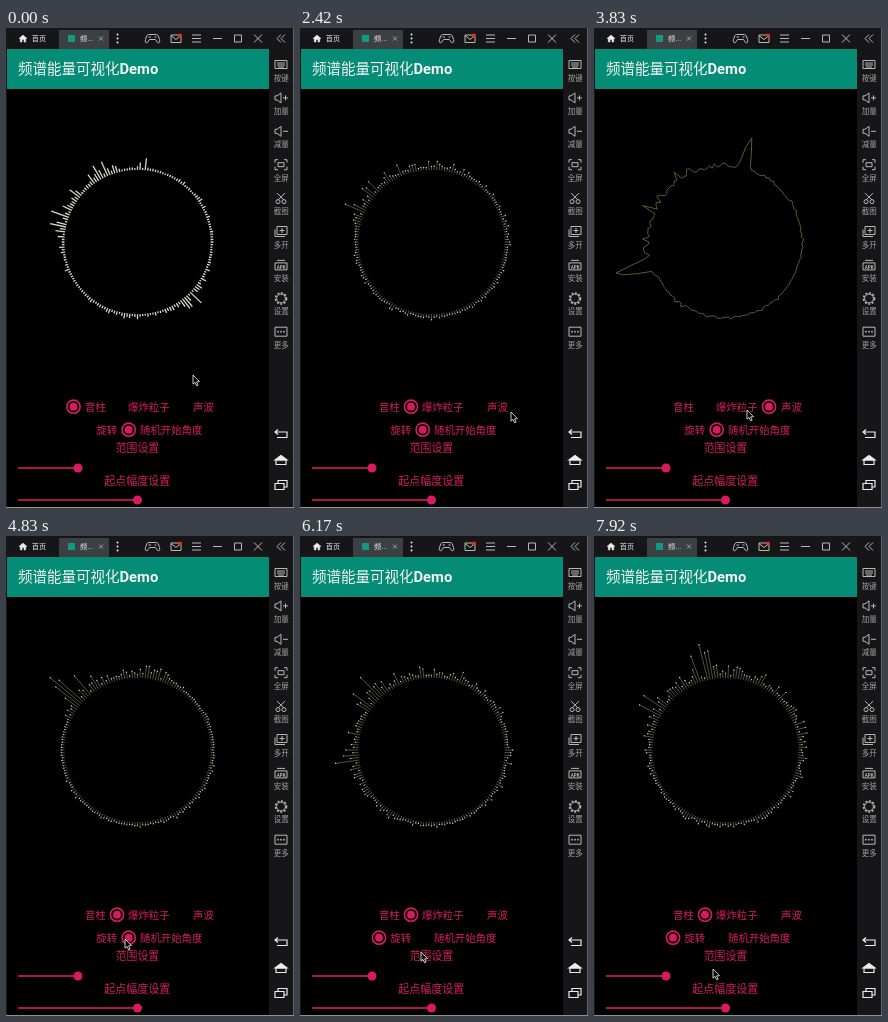
Recreate the animation shown at these times as an HTML page with a canvas. Size 288 by 480 pixels, loop 8000 ms.

```html
<!DOCTYPE html>
<html lang="zh">
<head>
<meta charset="utf-8">
<style>
html, body { margin: 0; width: 100%; height: 100%; overflow: hidden; background: #000; }
canvas { display: block; width: 288px; height: 480px; }
</style>
</head>
<body>
<canvas id="stage"></canvas>
<script>
const W = 288, H = 480, LOOP = 8000, FPS = 12, TAU = Math.PI * 2;
const canvas = document.getElementById('stage');
const ctx = canvas.getContext('2d');
const dpr = window.devicePixelRatio || 1;
canvas.width = W * dpr;
canvas.height = H * dpr;

const CJK = '"Noto Sans CJK SC", "Noto Sans CJK", sans-serif';
const CHROME = '#161618', GREY = '#b8b8b4', LIGHT = '#ecece8';
const TEAL = '#048c76', PINK = '#d81b60';
const CX = 131.5, CY = 214, R = 73.6, SQUASH = .987, BARS = 180;
const COLUMNS = 0, PARTICLES = 1, WAVE = 2;

const STYLES = [
  { stroke: '#d8d8c8', width: 1.3, base: 1.3 },
  { stroke: '#52523c', width: 1, base: 1.8 },
  { stroke: '#64643c', width: .9, base: 2 }
];

// Each phase runs until a tick; a lobe is [angle, spread, height].
const PHASES = [
  { until: 18, mode: COLUMNS, lobes: [[-2.72, .25, 24], [-2.05, .15, 21], [-1.5, .1, 8]], roam: true },
  { until: 31, mode: PARTICLES, lobes: [[-2.62, .25, 27], [-2.05, .1, 22], [-1.5, .3, 5]] },
  { until: 48, mode: WAVE, lobes: [[-1.33, .05, 32], [2.85, .06, 36], [-2.5, .6, 14]] },
  { until: 63, mode: PARTICLES, lobes: [[-2.4, .17, 38], [-2.05, .15, 16], [-1.5, .4, 8]] },
  { until: 96, mode: PARTICLES, lobes: [[-1.8, .17, 24], [-2.6, .1, 20], [-1.5, 1.8, 9]], spin: true }
];

// Pointer stops: tick, x, y
const POINTER = [
  [0, 187, 347], [16, 146, 376], [29, 211, 384], [46, 153, 382],
  [58, 119, 403], [62, 100, 402], [74, 121, 416], [95, 119, 433]
];

function hash(a, b) {
  const s = Math.sin(a * 127.1 + b * 311.7 + 17.3) * 43758.5453;
  return s - Math.floor(s);
}

function text(str, x, y, size, color, weight = 400, family = CJK) {
  ctx.font = `${weight} ${size}px ${family}`;
  ctx.fillStyle = color;
  ctx.fillText(str, x, y);
}

function rect(x, y, w, h, color) {
  ctx.fillStyle = color;
  ctx.fillRect(x, y, w, h);
}

function dot(x, y, r, color) {
  ctx.fillStyle = color;
  ctx.beginPath();
  ctx.arc(x, y, r, 0, TAU);
  ctx.fill();
}

function circle(x, y, r, color, width) {
  ctx.strokeStyle = color;
  ctx.lineWidth = width;
  ctx.beginPath();
  ctx.arc(x, y, r, 0, TAU);
  ctx.stroke();
}

// Draws an SVG path around a centre point, optionally filled.
function icon(x, y, d, { color = GREY, width = 1, fill } = {}) {
  const path = new Path2D(d);
  ctx.save();
  ctx.translate(x, y);
  if (fill) {
    ctx.fillStyle = fill;
    ctx.fill(path);
  }
  ctx.strokeStyle = color;
  ctx.lineWidth = width;
  ctx.stroke(path);
  ctx.restore();
}

function topBar() {
  rect(0, 0, W, 21, CHROME);
  rect(53, 2, 50, 19, '#3c4042');
  icon(17, 10.5, 'M-4 0L0-3.5L4 0H2.7V3.5H1V1H-1V3.5H-2.7V0Z', { color: LIGHT, width: .5, fill: LIGHT });
  text('首页', 25.7, 13.2, 7.2, LIGHT, 500);
  rect(62, 7, 7, 7, '#129a80');
  text('频...', 74, 13.2, 7.2, LIGHT, 500);
  icon(95, 10.5, 'M-2-2L2 2M2-2L-2 2', { width: .8 });
  for (const y of [6.5, 10.5, 14.5]) dot(111.5, y, 1, LIGHT);
  icon(146.5, 10.5, 'M-4-4H4Q6-4 7 1Q8 5 5 4L3 1H-3L-5 4Q-8 5-7 1Q-6-4-4-4ZM-4-1.5H-1.5M2-1.5H4');
  icon(170, 10.5, 'M-5-3.5H5V4H-5ZM-5-3L0 1L5-3');
  dot(174, 7.5, 2, '#e83018');
  icon(190.5, 10.5, 'M-4.5-3.5H4.5M-4.5 0H4.5M-4.5 3.5H4.5');
  icon(211.5, 10.5, 'M-4.5 0H4.5');
  icon(232, 10.5, 'M-3.5-3.5H3.5V3.5H-3.5Z');
  icon(252, 10.5, 'M-4-4L4 4M4-4L-4 4');
  icon(275, 10.5, 'M0-4L-4 0L0 4M4-4L0 0L4 4');
}

const SPEAKER = 'M-6-2H-4L0-5V5L-4 2H-6Z';
const TOOLS = [
  ['按键', 'M-6-4H6V4H-6ZM-4-1.5H4M-4 .5H4M-3 2.5H3'],
  ['加量', SPEAKER + 'M2 0H7M4.5-2.5V2.5'],
  ['减量', SPEAKER + 'M2 0H7'],
  ['全屏', 'M-6-2V-5H-3M3-5H6V-2M6 2V5H3M-3 5H-6V2M-3-2H3V2H-3Z'],
  ['截图', 'M-4-5L3 2M4-5L-3 2M-5 3.5A2 2 0 1 0-1 3.5A2 2 0 1 0-5 3.5M1 3.5A2 2 0 1 0 5 3.5A2 2 0 1 0 1 3.5'],
  ['多开', 'M-6-2V5H4M-4-5H6V3H-4ZM1-3.5V1.5M-1.5-1H3.5'],
  ['安装', 'M-6-2V5H6V-2ZM-4-4.5H4'],
  ['设置', ''],
  ['更多', 'M-6-4.5H6V4.5H-6Z']
];

function sideBar() {
  rect(263, 21, 25, H - 21, CHROME);
  rect(0, 21, 1, H - 21, CHROME);
  TOOLS.forEach(([label, d], i) => {
    const y = 36.5 + i * 33.4;
    icon(275, y, d);
    text(label, 267.7, y + 16, 7.5, '#a4a4a0');
  });
  text('APK', 270.7, 240.5, 4.6, GREY, 700, 'Roboto, sans-serif');
  ctx.setLineDash([2, 1.6]);
  circle(275, 270.5, 5.5, GREY, 1.6);
  ctx.setLineDash([]);
  circle(275, 270.5, 4.4, GREY, 1);
  for (const x of [272, 275, 278]) dot(x, 303.7, .9, GREY);

  const nav = { color: LIGHT, width: 1.2 };
  icon(275, 405.5, 'M-3-4L-6-1.5L-3 1M-6-1.5H6V4H-4', nav);
  icon(275, 432, 'M-5 0H5V4.5H-5Z', nav);
  icon(275, 432, 'M-6 0L0-4.5L6 0Z', { ...nav, fill: LIGHT });
  icon(275, 457, 'M-6-1.5H3V4.5H-6ZM-3-1.5V-4.5H6V2H3', nav);

  rect(287, 0, 1, H, '#5c6468');
  rect(0, 479, W, 1, '#8a9498');
}

function radio(x, y) {
  circle(x, y, 6.6, PINK, 1.6);
  dot(x, y, 3.9, PINK);
}

function slider(y, end) {
  rect(12, y - .8, end - 12, 1.6, PINK);
  dot(end, y, 4.5, PINK);
}

function controls(mode, spin) {
  radio([67.5, 111, 175][mode], 378.7);
  text('音柱', 79, 382.7, 10.4, PINK);
  text('爆炸粒子', 122, 382.7, 10.4, PINK);
  text('声波', 187, 382.7, 10.4, PINK);
  radio(spin ? 79 : 122.7, 401.7);
  text('旋转', 90.3, 405.5, 10.4, PINK);
  text('随机开始角度', 134, 405.5, 10.4, PINK);
  text('范围设置', 109.7, 424.3, 10.9, PINK);
  text('起点幅度设置', 98.3, 456.5, 11, PINK);
  slider(440, 72);
  slider(472, 131.5);
}

// Random heights under bell-shaped lobes; some lobes roam or spin.
function spectrum(tick, { mode, lobes, roam, spin }) {
  const all = roam ? [...lobes, [.75 + tick * .085, .22, 15 - tick * .4]] : lobes;
  const turn = spin ? (tick - 95) * .03 : 0;
  return Array.from({ length: BARS }, (_, i) => {
    const angle = i / BARS * TAU;
    const noise = hash(i, tick);
    let level = STYLES[mode].base + hash(i, tick + 50) + 3 * noise ** 4;
    for (const [centre, spread, height] of all) {
      const d = angle - centre - turn;
      const away = Math.atan2(Math.sin(d), Math.cos(d)) / spread;
      const rough = mode === WAVE && spread < .1 ? 1 : noise ** 1.7;
      level += height * Math.exp(-away * away) * rough;
    }
    return level;
  });
}

function polar(i, r) {
  const a = i / BARS * TAU;
  return [CX + r * Math.cos(a), CY + r * Math.sin(a) * SQUASH];
}

function ring(levels, mode) {
  const { stroke, width } = STYLES[mode];
  ctx.beginPath();
  levels.forEach((level, i) => {
    if (mode !== WAVE) ctx.moveTo(...polar(i, R - .5));
    ctx.lineTo(...polar(i, R + level));
  });
  if (mode === WAVE) ctx.closePath();
  ctx.strokeStyle = stroke;
  ctx.lineWidth = width;
  ctx.stroke();
  if (mode === PARTICLES) {
    levels.forEach((level, i) => dot(...polar(i, R + level), .7, '#ccccb4'));
  }
}

function pointer(tick) {
  const n = Math.max(1, POINTER.findIndex(p => p[0] >= tick));
  const [from, x0, y0] = POINTER[n - 1];
  const [to, x1, y1] = POINTER[n];
  const u = (tick - from) / (to - from);
  const ease = u * u * (3 - 2 * u);
  icon(x0 + (x1 - x0) * ease, y0 + (y1 - y0) * ease,
    'M0 0V9.2L2 7.4L3.6 10.8L5.1 10.1L3.6 6.9L6.5 6.7Z',
    { color: '#e0e0d8', width: .9, fill: '#000' });
}

function draw(ms) {
  const tick = Math.min(95, Math.floor((ms % LOOP + 8) * FPS / 1000));
  const phase = PHASES.find(p => tick < p.until);
  ctx.setTransform(dpr, 0, 0, dpr, 0, 0);
  rect(0, 0, W, H, '#000');
  rect(0, 21, 263, 40, TEAL);
  text('频谱能量可视化', 12, 46.3, 14.5, '#f6f6f2');
  text('Demo', 113.5, 46.3, 14.8, '#f6f6f2', 700, 'Roboto, sans-serif');
  ring(spectrum(tick, phase), phase.mode);
  controls(phase.mode, phase.spin);
  topBar();
  sideBar();
  pointer(tick);
}

const start = performance.now();
function loop() {
  draw(performance.now() - start);
  requestAnimationFrame(loop);
}
loop();
</script>
</body>
</html>
```
